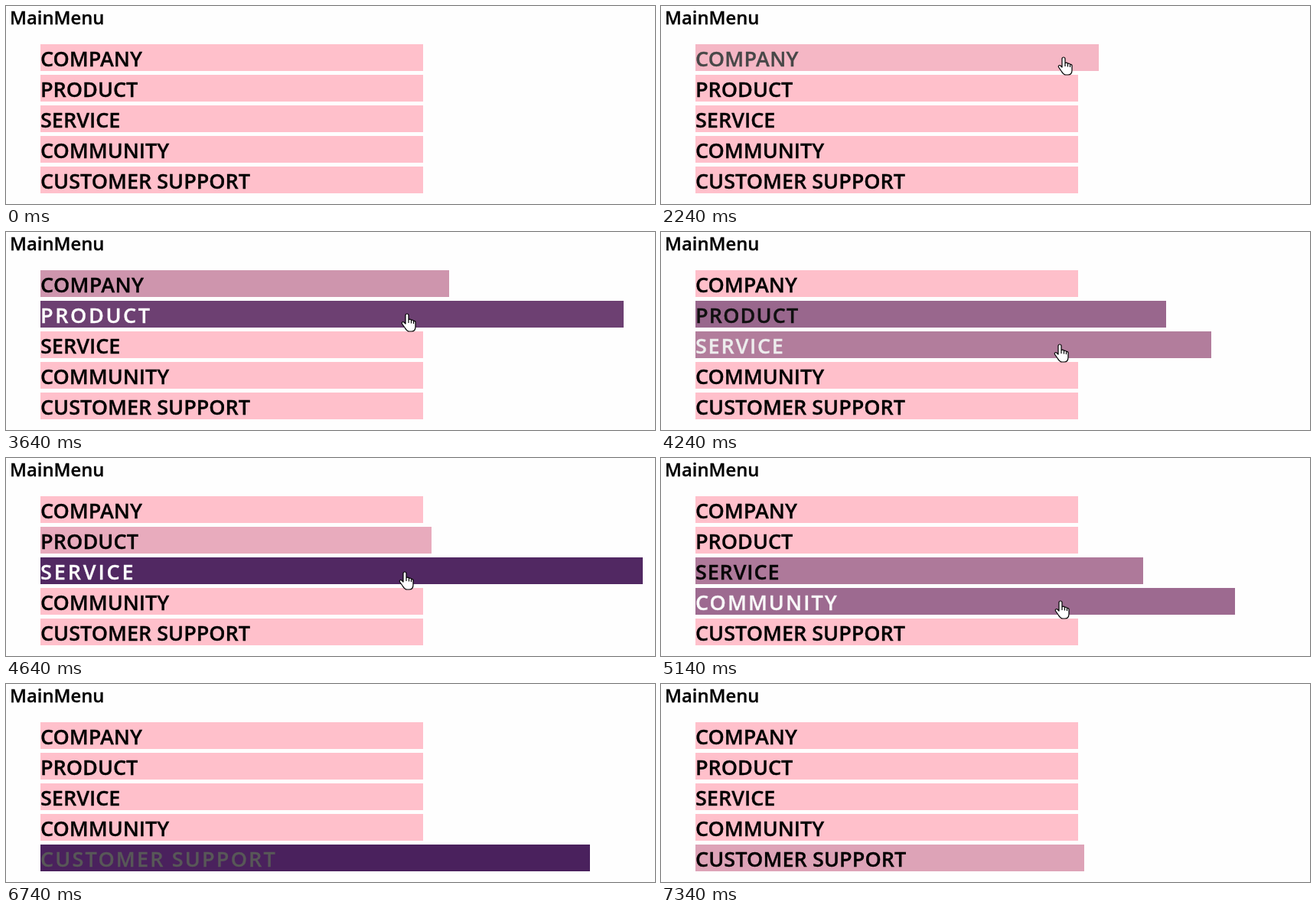
Recreate the animation shown at these times as an HTML page. Size 848 px wide and 259 px high, loop 7440 ms.

```html
<!DOCTYPE html>
<html lang="en">
<head>
<meta charset="utf-8">
<title>MainMenu</title>
<style>
html, body { margin: 0; width: 100%; height: 100%; overflow: hidden; background: #fefefe; }
body { position: relative; font: 600 27px "Open Sans", "Noto Sans", sans-serif; color: #000; -webkit-text-stroke: .3px; }
h2 { position: absolute; left: 5px; top: 0; margin: 0; font: inherit; font-size: 23.8px; line-height: 30px; }
.bar { position: absolute; left: 45px; height: 35px; line-height: 37px; white-space: nowrap; }
svg { position: absolute; left: 0; top: 0; overflow: visible; }
path { fill: #fff; stroke: #000; stroke-width: 1.2; stroke-linejoin: round; }
</style>
</head>
<body>
<h2>MainMenu</h2>
<svg width="1" height="1">
  <path id="arrow" d="M0 0v17l4-4 3 6 2.5-1-2.5-6h5z"/>
  <path id="hand" d="M-2 13V2a2 2 0 0 1 4 0v6a2 2 0 0 1 3.5.5a2 2 0 0 1 3 1a1.8 1.8 0 0 1 2.5 1.5v6c0 4-2 6-5 6h-3c-3 0-4-2-6-5l-3.5-5c-1-2 1-3 2.5-2zM2 8v4M5.5 9v3.5M8.5 10v3"/>
</svg>
<script>
const LOOP = 7440, APPEAR = 930, GONE = 6680;
const TOP = 50, STEP = 40, HEIGHT = 35;
const PINK = [255, 192, 203], PURPLE = [36, 0, 70];

// when the pointer enters and leaves each bar, in ms
const items = [
  { label: 'COMPANY', enter: 2145, leave: 3043 },
  { label: 'PRODUCT', enter: 3058, leave: 3893 },
  { label: 'SERVICE', enter: 3905, leave: 4728 },
  { label: 'COMMUNITY', enter: 4740, leave: 5345 },
  { label: 'CUSTOMER SUPPORT', enter: 5375, leave: 6550 }
];

const svg = document.querySelector('svg');
const [arrow, hand] = svg.children;
const clamp = u => Math.max(0, Math.min(1, u));
const mix = (a, b, p) => a + (b - a) * p;
const bezier = (s, a, b) => 3 * s * (1 - s) ** 2 * a + 3 * s * s * (1 - s) * b + s ** 3;

// CSS "ease": cubic-bezier(.25, .1, .25, 1)
function ease(u) {
  if (u <= 0 || u >= 1) return clamp(u);
  let lo = 0, hi = 1;
  for (let i = 0; i < 24; i++) {
    const s = (lo + hi) / 2;
    if (bezier(s, .25, .25) < u) lo = s; else hi = s;
  }
  return bezier(lo, .1, 1);
}

// A reversed transition is shortened by the share already covered.
function progress(t, { enter, leave }, duration) {
  const p = ease((Math.min(t, leave) - enter) / duration);
  return t > leave ? p * (1 - ease((t - leave) / (duration * p))) : p;
}

items.forEach((item, i) => {
  item.top = TOP + STEP * i;
  item.bar = document.createElement('div');
  item.bar.className = 'bar';
  item.bar.textContent = item.label;
  item.bar.style.top = item.top + 'px';
  svg.before(item.bar);
});

function drawBar(item, t) {
  const size = progress(t, item, 1000);
  const fill = progress(t, item, 1500);
  const ink = Math.round(255 * progress(t, item, 500));
  Object.assign(item.bar.style, {
    width: 500 + 300 * size + 'px',
    letterSpacing: 3 * size + 'px',
    color: `rgb(${ink},${ink},${ink})`,
    backgroundColor: `rgb(${PINK.map((c, k) => Math.round(mix(c, PURPLE[k], fill)))})`
  });
}

// Rises along the right side, rests, then arcs over to the first bar.
function approach(t) {
  const rise = clamp((t - APPEAR) / 400);
  const arc = clamp((t - 1500) / (items[0].enter - 1500));
  return [
    mix(618, 604, rise) - 78 * arc,
    mix(199, 55, rise) - 5 * arc - 190 * arc * (1 - arc)
  ];
}

// Sways sideways while it steps into each bar, rests, and moves on.
function browse(t) {
  const { top, enter, leave } = items.findLast(item => t >= item.enter);
  const rest = 17;
  const out = Math.max(0, (t - leave + 100) / 100);
  return [
    524 + 3 * Math.cos((t - 2700) / 3700 * 2 * Math.PI),
    top + rest * clamp((t - enter) / 90) + (HEIGHT - rest) * out
  ];
}

function drawPointer(t) {
  const visible = t >= APPEAR && t < GONE;
  svg.style.display = visible ? '' : 'none';
  if (!visible) return;
  const [x, y] = (t < items[0].enter ? approach : browse)(t).map(Math.round);
  const over = items.some(({ enter, leave }) => t >= enter && t < leave);
  svg.style.transform = `translate(${x}px,${y}px)`;
  hand.style.display = over ? '' : 'none';
  arrow.style.display = over ? 'none' : '';
}

const start = performance.now();
function frame() {
  const t = (performance.now() - start) % LOOP;
  items.forEach(item => drawBar(item, t));
  drawPointer(t);
  requestAnimationFrame(frame);
}
frame();
</script>
</body>
</html>
```
